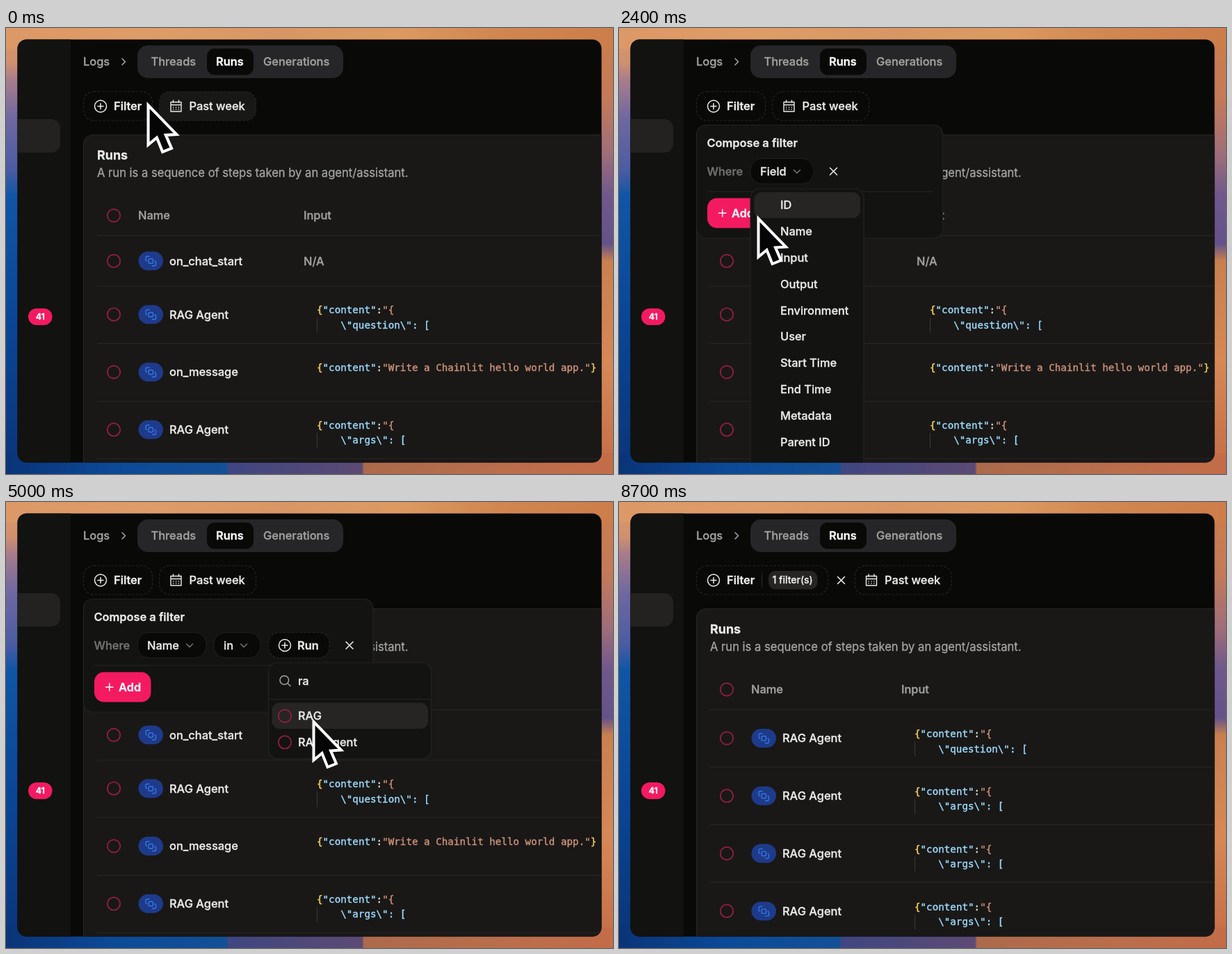
Write an HTML page that moves like this. It is 873 px wide and 641 px high and loops after 8.8 s.

```html
<!DOCTYPE html>
<html lang="en">
<head>
<meta charset="utf-8">
<title>Filtering runs</title>
<style>
  html, body { margin: 0; width: 100%; height: 100%; overflow: hidden; background: #090908; }
  svg { display: block; width: 100%; height: 100%; }
  text { font-family: Inter, sans-serif; white-space: pre; stroke-width: .3; }
  .mono { font-family: "DejaVu Sans Mono", monospace; stroke-width: .4; }
</style>
</head>
<body>
<svg id="stage" viewBox="0 0 873 641" preserveAspectRatio="none">
  <defs>
    <clipPath id="window"><rect x="16.5" y="16.5" width="840" height="608" rx="13"/></clipPath>
  </defs>
  <g id="wallpaper"></g>
  <g id="app" clip-path="url(#window)"></g>
  <g id="pointer"></g>
</svg>
<script>
const LOOP = 8800, STEP = 100;
const color = {
  main: '#090908', side: '#121211', card: '#191817', pop: '#131312', line: '#282726',
  hover: '#262524', text: '#ececea', muted: '#a3a3a1', dim: '#747472',
  pink: '#f31a62', ring: '#9a1d47', blue: '#1e3a8a', icon: '#3576e0'
};
const $ = id => document.getElementById(id);

// Drawing helpers: boxes take their edges, labels their vertical centre.
const box = (x1, y1, x2, y2, r, fill, extra = '') =>
  `<rect x="${x1}" y="${y1}" width="${x2 - x1}" height="${y2 - y1}" rx="${r}" fill="${fill}" ${extra}/>`;
const label = (x, y, str, fill = color.text, weight = 500, size = 16.4, extra = '') =>
  `<text x="${x}" y="${y + size * .36}" fill="${fill}" stroke="${fill}" font-weight="${weight}" font-size="${size}" ${extra}>${str}</text>`;
const stroke = (d, c = color.text, w = 1.6, extra = '') =>
  `<path d="${d}" fill="none" stroke="${c}" stroke-width="${w}" stroke-linecap="round" stroke-linejoin="round" ${extra}/>`;
const rule = (x1, x2, y) => stroke(`M${x1} ${y}H${x2}`, color.line, 1.2);
const ring = (x, y) => `<circle cx="${x}" cy="${y}" r="9.2" fill="none" stroke="${color.ring}" stroke-width="1.7"/>`;
const cross = (x, y) => stroke(`M${x - 5} ${y - 5}l10 10m0-10l-10 10`);
const chevron = (x, y) => stroke(`M${x - 4.5} ${y - 2}l4.5 4.5 4.5-4.5`, color.dim, 1.5);
const plusCircle = (x, y) => stroke(`M${x - 8.5} ${y}a8.5 8.5 0 1 0 17 0a8.5 8.5 0 1 0-17 0M${x - 4} ${y}h8m-4-4v8`, color.text, 1.5);
const dashed = (x1, y1, x2, y2, fill = 'none') =>
  box(x1, y1, x2, y2, 15, fill, 'stroke="#262524" stroke-width="1.2" stroke-dasharray="3.5 2.5"');
const panel = (x1, y1, x2, y2) => box(x1, y1, x2, y2, 13, color.pop, 'stroke="#242322" stroke-width="1.2"');

const calendar = (x, y) => stroke(
  `M${x - 7.5} ${y - 6}h15v13.5h-15zM${x - 7.5} ${y - 2}h15M${x - 4} ${y - 8.5}v3m8-3v3` +
  `M${x - 4} ${y + 1.5}h.2m3.8 0h.2m3.6 0h.2M${x - 4} ${y + 4.5}h.2m3.8 0h.2m3.6 0h.2`, color.text, 1.4);

const stepBadge = y => box(190.5, y - 13.5, 226, y + 13.5, 13.5, color.blue) +
  box(205, y - 3, 211.5, y + 3.5, 2, 'none', `stroke="${color.icon}" stroke-width="1.4"`) +
  stroke(`M206 ${y - 6.5}h-3q-2 0-2 2v3q0 1.5 1.5 1.5M210.5 ${y + 7}h3q2 0 2-2v-3q0-1.5-1.5-1.5`, color.icon, 1.4);

const tinted = parts => parts.map(([c, s]) => `<tspan fill="${c}" stroke="${c}">${s}</tspan>`).join('');
const mono = (x, y, parts) => label(x, y, tinted(parts), color.text, 400, 14.23, 'class="mono"');
const gold = '#f4cf57', key = '#9cdcfe', str = '#ce9178';
const opening = [[gold, '{'], [key, '"content"'], ['#ddd', ':']];
const jsonBlock = (x, y, name) =>
  mono(x, y - 6.5, [...opening, [str, '"{']]) +
  mono(x + 34.2, y + 15, [[key, `\\"${name}\\": [`]]) +
  stroke(`M${x + .5} ${y + 5}v21`, '#3a3938', 1);

const row = (y, name, content) => ring(155, y) + stepBadge(y) + label(235, y, name) + content;

function table(t) {
  const filtered = t >= 7100, loading = t < 7900;
  const head = box(111.5, 153.5, 900, 680, 14, color.card, 'stroke="#272625" stroke-width="1.2"') +
    label(131, 182.5, 'Runs', color.text, 700, 17.9) +
    label(131, 208, 'A run is a sequence of steps taken by an agent/assistant.', color.muted, 400, 16.58) +
    ring(155, 269.5) + label(190, 269.5, 'Name', color.muted) +
    label(filtered ? 406 : 428, 269.5, 'Input', color.muted);
  if (filtered) {
    const rows = ['question', 'args', 'args', 'args'].map((name, i) => {
      const y = 339.5 + i * 82.8;
      return rule(131, 857, y - 41.5) +
        row(y, 'RAG Agent', loading ? label(604, y, 'Loading...') : jsonBlock(425, y, name));
    });
    return head + rows.join('');
  }
  return head + [298.5, 371, 453.5, 536.5, 619].map(y => rule(131, 857, y)).join('') +
    row(334.8, 'on_chat_start', label(428, 334.8, 'N/A', color.muted)) +
    row(411.7, 'RAG Agent', jsonBlock(447, 411.7, 'question')) +
    row(494.5, 'on_message', mono(447, 488, [...opening, [str, '"Write a Chainlit hello world app."'], [gold, '}']])) +
    row(577.3, 'RAG Agent', jsonBlock(447, 577.3, 'args'));
}

const frame = () =>
  box(16, 16, 857, 625, 0, color.main) + box(16, 16, 93, 625, 0, color.side) +
  box(0, 131, 78, 179, 13, '#232221') +
  box(32, 403, 66.5, 427, 12, color.pink) +
  label(49.2, 415, '41', '#fff', 700, 12.2, 'text-anchor="middle"') +
  label(111, 48, 'Logs', color.muted) + stroke('M167 44l4.5 4.5-4.5 4.5', color.muted) +
  box(189, 25, 485, 72, 15, '#262628') + box(289, 29.5, 356, 67.5, 11, color.main) +
  label(208.5, 48, 'Threads', color.muted) + label(302, 48, 'Runs', '#fff', 600) +
  label(370, 48, 'Generations', color.muted);

function toolbar(t) {
  const chosen = t >= 6000;
  const filterFill = t >= 300 && t < 2000 ? color.hover : 'none';
  const weekFill = t < 200 ? '#181817' : 'none';
  const shift = chosen ? 118.5 : 0;
  return dashed(111.5, 91.5, chosen ? 300.5 : 210.5, 133, filterFill) +
    plusCircle(136, 112.5) + label(155, 112.5, 'Filter', color.text, 600) +
    (chosen ? stroke('M205.5 102v20', color.line, 1.2) + box(215, 99, 285.5, 125.5, 10, color.hover) +
      label(220.5, 112, '1 filter(s)', color.text, 500, 14) + cross(319.5, 112.5) : '') +
    dashed(220.5 + shift, 91.5, 359.5 + shift, 133, weekFill) +
    calendar(244.5 + shift, 112.5) + label(263.5 + shift, 112.5, 'Past week');
}

const select = (x1, x2, name) => box(x1, 187.5, x2, 224, 17, color.main, 'stroke="#222120"') +
  label(x1 + 14, 206, name) + chevron(x2 - 24, 206);

const addButton = y => box(127, y - 21.5, 208.5, y + 21.5, 14, color.pink) +
  stroke(`M143.5 ${y}h10.5m-5.25-5.25v10.5`, '#fff', 1.5) + label(162, y, 'Add', '#fff', 600);

function menu(x1, x2, bottom, items, active, headed) {
  return panel(x1, 231, x2, bottom) +
    box(x1 + 5.5, 236 + active * 37.8, x2 - 5, 273 + active * 37.8, 11, color.hover) +
    items.map((name, i) => label(x1 + 43, 254.5 + i * 37.8, name, color.text, headed && !i ? 600 : 500)).join('');
}

function runMenu(t) {
  const typed = 'rag'.slice(0, Math.max(0, Math.floor((t - 4500) / 200)));
  const items = typed ? ['RAG', 'RAG Agent'] : ['RAG', 'RAG Agent', 'on_chat_start', 'on_message'];
  const active = t >= 5600 ? 1 : 0, top = 288.5 + active * 37.8;
  return panel(377.5, 231, 611.5, 293.5 + items.length * 37.8) +
    stroke('M394 256a6.3 6.3 0 1 0 12.6 0a6.3 6.3 0 1 0-12.6 0M405 260.5l4 4', color.muted, 1.5) +
    label(420, 257.5, typed || 'Run', typed ? color.text : color.dim) + rule(378, 611, 283.5) +
    box(382.5, top, 607, top + 37.5, 11, color.hover) +
    items.map((name, i) => {
      const y = 307.5 + i * 37.8;
      const checked = i === 1 && t >= 6000;
      const mark = checked
        ? `<circle cx="401" cy="${y}" r="9.8" fill="${color.pink}"/>` + stroke(`M396.5 ${y + .5}l3 3 6-6.5`, '#fff')
        : ring(401, y);
      return mark + label(420, y, name);
    }).join('');
}

function composer(t) {
  if (t < 1000 || t >= 7100) return '';
  const title = label(126.5, 165.5, 'Compose a filter', color.text, 600);
  if (t < 2200) return panel(111.5, 139.5, 465.5, 293) + title +
    label(126.5, 201, 'No filter applied', color.text, 500, 14) + rule(127, 452, 225.5) + addButton(256.5);

  const stage = t < 3100 ? 'field' : t < 4200 ? 'operator' : t < 6000 ? 'value' : 'done';
  const right = { field: 465.5, operator: 485, value: 528, done: 633 }[stage];
  const close = { field: 308.5, operator: 450.5, value: 494, done: 598.5 }[stage];
  let out = panel(111.5, 139.5, right, 302) + title + label(126.5, 206, 'Where', color.dim) +
    rule(127, right - 14, 235) + addButton(266) + cross(close, 206);

  if (stage === 'field') return out + select(189, 280, 'Field') +
    menu(189, 352, 660, ['ID', 'Name', 'Input', 'Output', 'Environment', 'User', 'Start Time',
      'End Time', 'Metadata', 'Parent ID'], t < 2700 ? 0 : 1);

  out += select(189, 288, 'Name');
  if (stage === 'operator') return out + select(299, 422, 'Operator') +
    menu(299, 518.5, 430, ['stringList [Optional]', 'in', 'not in', 'is empty', 'is not empty'], 1, true);

  const done = stage === 'done';
  out += select(299, 366, 'in') + dashed(377.5, 187.5, done ? 569 : 465, 224, color.main) +
    plusCircle(401, 206) + label(419, 206, 'Run', color.text, 600);
  if (done) out += stroke('M460.5 196v20', color.line, 1.2) + box(470, 192.5, 555, 218.5, 11, color.hover) +
    label(476, 205.5, 'RAG Agent', color.text, 500, 14);
  return out + runMenu(t);
}

// Pointer stops: time, x, y, scale
const stops = [
  [0, 202, 105, 1.03], [400, 172, 105, 1], [1700, 172, 105, 1], [2100, 198, 268, 1], [2400, 198, 268, 1],
  [2900, 262, 290, 1], [3200, 262, 290, 1], [3700, 432, 290, 1], [4300, 432, 290, 1], [5000, 440, 310, 1],
  [5700, 459, 340, 1], [6300, 459, 340, 1], [7000, 642, 65, .93], [7500, 642, 65, .93], [8100, 720, -90, .93]
];
const ease = p => p * p * (3 - 2 * p);

function pointerAt(t) {
  const n = stops.findIndex(s => s[0] > t);
  if (n < 0) return stops.at(-1).slice(1);
  const a = stops[n - 1], b = stops[n], p = ease((t - a[0]) / (b[0] - a[0]));
  return [1, 2, 3].map(i => a[i] + (b[i] - a[i]) * p);
}

const arrow = '<path d="M2.5 6V61L14.5 51 22.5 71 35 66 27 47.5 42 46.5Z" fill="#050505" stroke="#fff" stroke-width="4"/>';
const hand = `<path d="M-5 4C-5-3 4-2 5 4L9 21C10 15 18 15 19 21C21 16 27 17 28 22C31 18 37 20 37 26L38 40
  C38 47 33 49 32 57L10 59C8 52-1 45-12 36C-18 30-10 24-4 30L1 33Z" fill="#fff" stroke="#000"
  stroke-width="4" paint-order="stroke" stroke-linejoin="round"/>` +
  stroke('M10 35l1 14M19 34v15M27 34l-1 14', '#000', 2.6);

function pointer(t) {
  const [x, y, scale] = pointerAt(t);
  const shape = t >= 300 && t < 2300 ? hand : arrow;
  return `<g transform="translate(${x} ${y}) scale(${scale})">${shape}</g>`;
}

function strip(id, x1, y1, x2, y2, colors) {
  const vertical = y2 - y1 > x2 - x1;
  const end = vertical ? 'x2="0" y2="641"' : 'x2="873" y2="0"';
  const marks = colors.map(([at, c]) => `<stop offset="${at / (vertical ? 641 : 873)}" stop-color="${c}"/>`).join('');
  return `<linearGradient id="${id}" gradientUnits="userSpaceOnUse" x1="0" y1="0" ${end}>${marks}</linearGradient>` +
    box(x1, y1, x2, y2, 0, `url(#${id})`);
}

$('wallpaper').innerHTML =
  strip('left', 0, 0, 40, 641, [[0, '#dc9866'], [50, '#d0906e'], [75, '#a87c8c'], [130, '#6f68a2'],
    [205, '#4a5ca2'], [240, '#1056a6'], [420, '#0a4696'], [641, '#0a3478']]) +
  strip('right', 833, 0, 873, 641, [[0, '#cc7d4a'], [100, '#c47a58'], [180, '#a06e7a'], [240, '#70588c'],
    [310, '#64528a'], [335, '#c9804f'], [480, '#d68856'], [641, '#c46c48']]) +
  strip('top', 0, 0, 873, 30, [[0, '#dc9866'], [200, '#de9c68'], [400, '#d89664'], [560, '#dc9a62'],
    [700, '#d18752'], [873, '#cc7d4a']]) +
  strip('bottom', 0, 611, 873, 641, [[0, '#0a3478'], [160, '#0c4a98'], [317, '#145096'], [320, '#3f4680'],
    [512, '#5c4a74'], [515, '#ac6a4c'], [700, '#b86e4c'], [873, '#c46c48']]);

let shown = -1;
function draw(now) {
  const t = Math.floor(now % LOOP / STEP) * STEP;
  if (t !== shown) {
    shown = t;
    $('app').innerHTML = frame() + table(t) + toolbar(t) + composer(t);
    $('pointer').innerHTML = pointer(t);
  }
  requestAnimationFrame(() => draw(performance.now() - start));
}
const start = performance.now();
draw(0);
</script>
</body>
</html>
```
